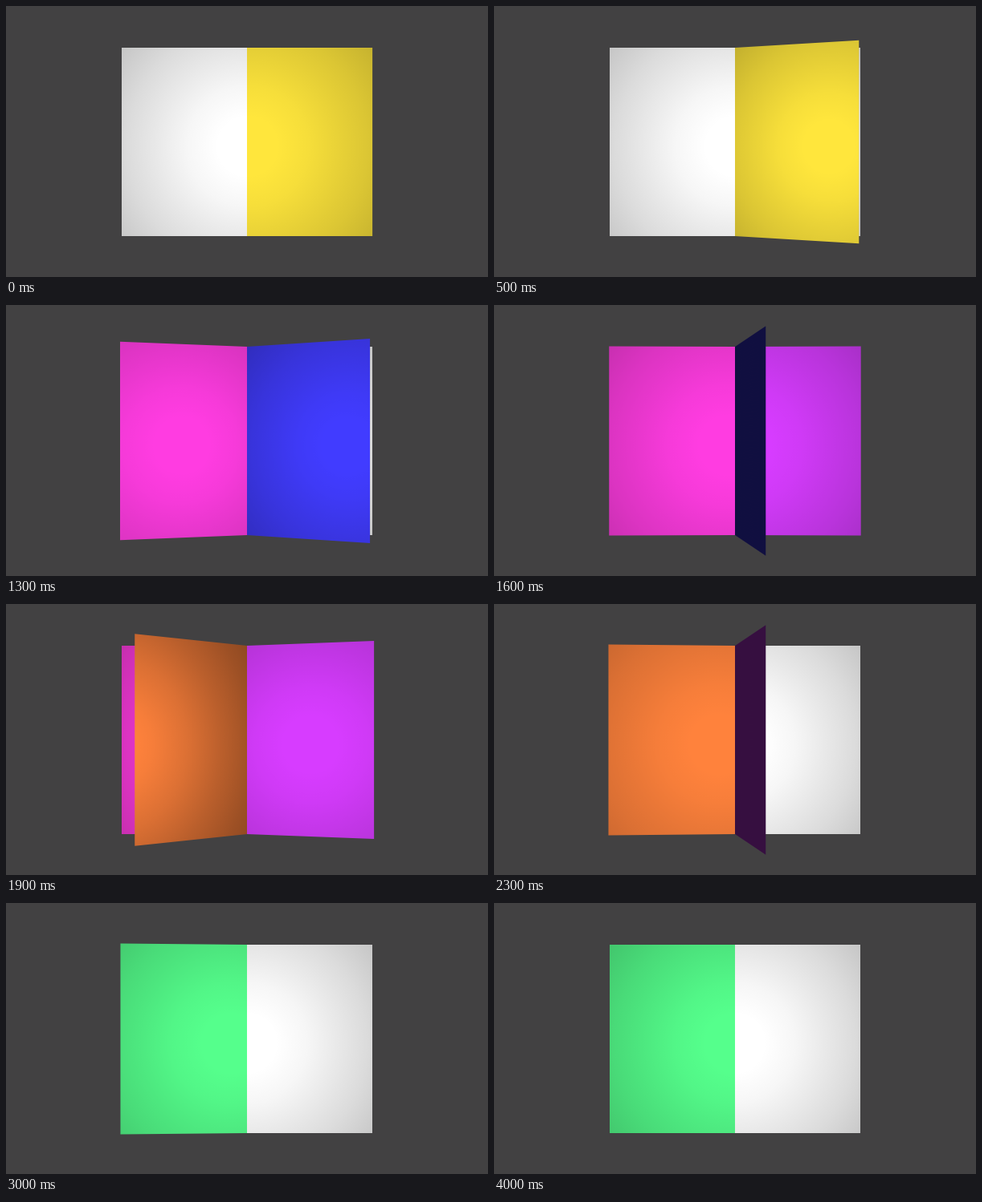
Recreate the animation shown at these times as an HTML page without scripts. Size 600x338 px, loop 6700 ms.

```html
<!DOCTYPE html>
<html lang="en">
<head>
<meta charset="utf-8">
<title>Turning pages</title>
<style>
  @property --clock {
    syntax: "<number>";
    inherits: true;
    initial-value: 0;
  }

  html, body {
    margin: 0;
    width: 100%;
    height: 100%;
    overflow: hidden;
    background: #424142;
  }

  /* The clock counts tenths of a second. */
  .stage {
    position: relative;
    width: 600px;
    height: 338px;
    overflow: hidden;
    animation: tick 6.7s steps(67) infinite;
  }

  @keyframes tick {
    from { --clock: 0; }
    to { --clock: 67; }
  }

  .book, .page {
    position: absolute;
    top: 51.5px;
    height: 235px;
    background:
      radial-gradient(circle calc(var(--reach) * 4) at var(--light) 123px,
        rgb(0 0 0 / 0) 3%, rgb(0 0 0 / .035) 6.25%, rgb(0 0 0 / .14) 12.5%,
        rgb(0 0 0 / .27) 18.75%, rgb(0 0 0 / .385) 25%, rgb(0 0 0 / .56) 37.5%,
        rgb(0 0 0 / .7) 62.5%, rgb(0 0 0 / .75) 100%)
      var(--paper);
  }

  .book {
    --paper: #fff;
    --reach: 300px;
    --light: 156px;
    left: 144px;
    width: 312px;
  }

  /* Cubic ease in and out over two seconds, from flat right to flat left. */
  .page {
    --turn: clamp(0, (var(--clock) - var(--start)) / 20, 1);
    --in: min(var(--turn), .5);
    --out: min(1 - var(--turn), .5);
    --ease: (.5 + 4 * var(--in) * var(--in) * var(--in) - 4 * var(--out) * var(--out) * var(--out));
    --angle: calc(180deg * var(--ease));
    --reach: max(1px, 300px * cos(var(--angle)) * cos(var(--angle)));
    --foot: 300px * sin(var(--angle));
    width: 156px;
    backface-visibility: hidden;
  }

  /* A page that has not started to turn lies under the white sheet. */
  .front {
    --light: calc(var(--foot));
    left: 300px;
    transform-origin: left center;
    transform: perspective(850px) rotateY(calc(-1 * var(--angle)));
    opacity: min(1, var(--turn) * 99999);
  }

  .back {
    --light: calc(156px - var(--foot));
    left: 144px;
    transform-origin: right center;
    transform: perspective(850px) rotateY(calc(180deg - var(--angle)));
  }

  .first { --start: -1.4; }
  .second { --start: 6.45; }
  .third { --start: 13.45; }

  .yellow { --paper: #ffe63c; }
  .pink { --paper: #ff3ce1; }
  .blue { --paper: #413cff; }
  .orange { --paper: #ff823c; }
  .violet { --paper: #d73cff; }
  .green { --paper: #55ff8c; }
</style>
</head>
<body>
  <div class="stage">
    <div class="book"></div>
    <div class="page front third violet"></div>
    <div class="page front second blue"></div>
    <div class="page front first yellow"></div>
    <div class="page back first pink"></div>
    <div class="page back second orange"></div>
    <div class="page back third green"></div>
  </div>
</body>
</html>
```
